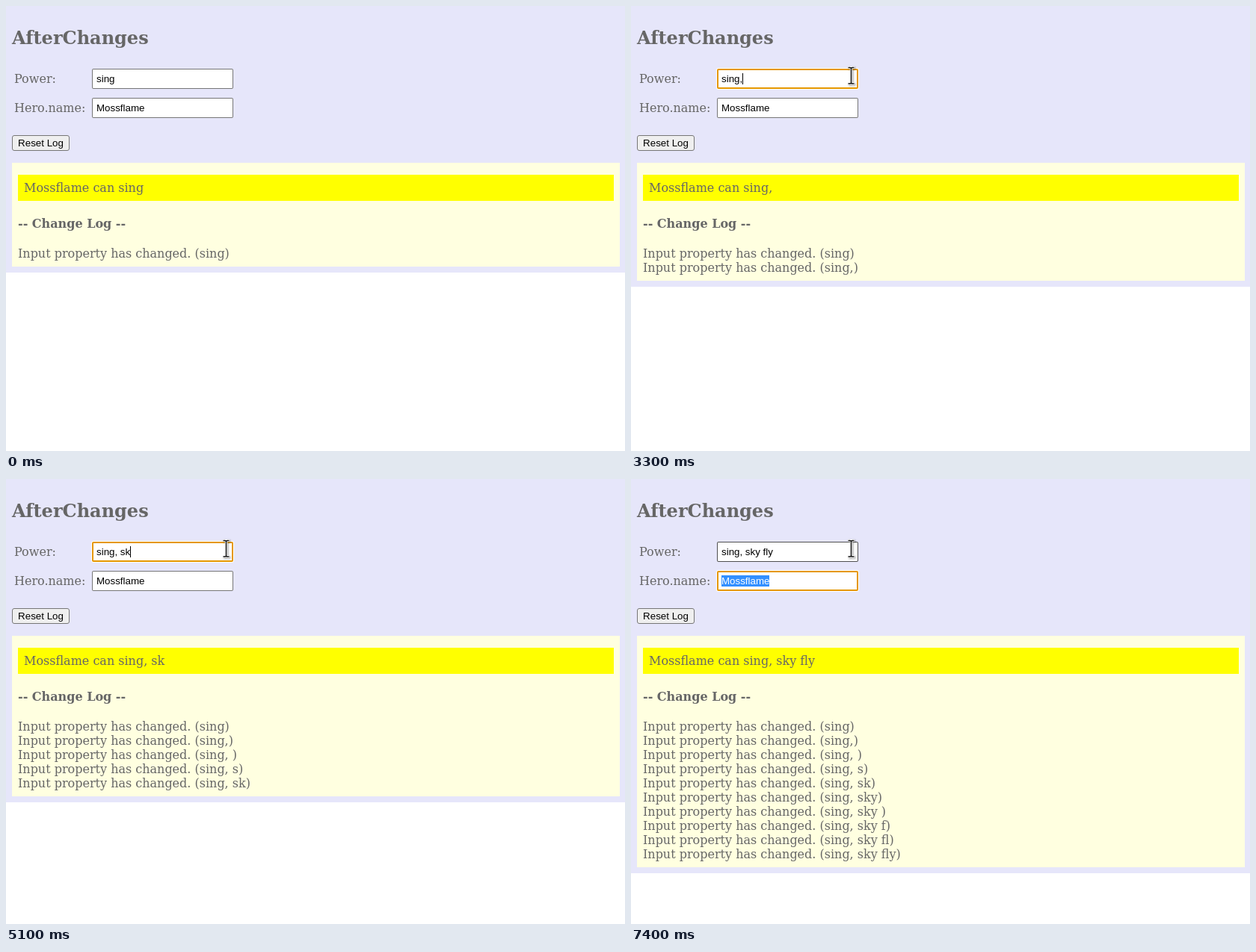
An HTML page that plays this animation: 828x596 px, repeating every 8 s.

```html
<!DOCTYPE html>
<html lang="en">
<head>
<meta charset="utf-8">
<title>AfterChanges</title>
<style>
  html, body { margin: 0; width: 100%; height: 100%; overflow: hidden; background: #fff; }
  #stage {
    position: relative; width: 828px; height: 596px; overflow: hidden;
    color: #666; font: 16px/19px "DejaVu Serif", serif; cursor: none;
  }
  #stage > * { position: absolute; margin: 0; box-sizing: border-box; }
  #page { left: 0; top: 0; width: 828px; background: #e6e6fa; }
  h2 { left: 8px; top: 28px; font-size: 24px; line-height: 29px; }
  .label { left: 11px; }
  .field, button { font: 13.3333px/15px "Liberation Sans", Arial, sans-serif; color: #000; }
  .field {
    left: 115px; width: 189px; height: 27px; padding: 6px;
    background: #fff; border-radius: 2px; white-space: pre;
    box-shadow: inset 0 0 0 1px #767676;
  }
  .field.hover { box-shadow: inset 0 0 0 1px #4f4f4f; }
  .field.focus { box-shadow: inset 0 0 0 2px #e59700, 0 0 0 1px #fff; }
  .field span { display: inline-block; height: 15px; vertical-align: top; }
  #name.focus span { background: #3390ff; color: #fff; }
  #caret { position: absolute; top: 6px; width: 1px; height: 15px; background: #000; }
  button {
    left: 8px; top: 173px; width: 77px; height: 21px; padding: 0;
    background: #efefef; border: 1px solid #767676; border-radius: 3px; cursor: none;
  }
  #panel { left: 8px; top: 210px; width: 813px; background: #ffffe0; }
  #hero { left: 16px; top: 226px; width: 797px; height: 35px; padding: 8px; background: #ff0; }
  h4 { left: 16px; top: 282px; font-size: 16px; }
  #log { left: 16px; top: 322px; white-space: pre; }
  #cursor { left: 0; top: 0; width: 40px; height: 40px; overflow: visible; filter: drop-shadow(1px 1px 1px #0006); }
</style>
</head>
<body>
<div id="stage">
  <div id="page"></div>
  <h2>AfterChanges</h2>
  <div class="label" style="top:88px">Power:</div>
  <div class="field" id="power" style="top:84px"><span id="text"></span><i id="caret"></i></div>
  <div class="label" style="top:127px">Hero.name:</div>
  <div class="field" id="name" style="top:123px"><span>Mossflame</span></div>
  <button tabindex="-1">Reset Log</button>
  <div id="panel"></div>
  <p id="hero"></p>
  <h4>-- Change Log --</h4>
  <div id="log"></div>
  <svg id="cursor">
    <path id="arrow" d="M0 0V21.5L4.8 17L8.2 24L11.8 22.4L8.5 15.4H14.6Z"
      fill="#111" stroke="#fff" stroke-width="1.2" stroke-linejoin="round"/>
    <g id="beam" fill="none">
      <path d="M-4 -10.5H-1Q.5 -10.5 .5 -9V9.500Q.5 11 -1 11H-4M5 -10.5H2Q.5 -10.5 .5 -9V9.500Q.5 11 2 11H5" stroke="#fff" stroke-width="3.4"/>
      <path d="M-3.500 -10.5H-1Q.5 -10.5 .5 -9V9.500Q.5 11 -1 11H-3.500M4.500 -10.5H2Q.5 -10.5 .5 -9V9.500Q.5 11 2 11H4.500" stroke="#111" stroke-width="1.500"/>
    </g>
  </svg>
</div>
<script>
const LOOP = 8000, APPEAR = 700, FOCUS = 1950, TAB = 7400, BLINK = 500;
const FULL = 'sing, sky fly', START = 4;
const KEYS = [3300, 3800, 4600, 5100, 5300, 5450, 5750, 5850, 6000];
// Cursor path: [time, x, y]
const PATH = [[700, 788, 566], [1200, 313, 94], [1550, 294, 93]];
const $ = id => document.getElementById(id);
const show = (el, on) => { el.style.visibility = on ? 'visible' : 'hidden'; };

let shownLength = -1;

function setText(length) {
  if (length === shownLength) return;
  shownLength = length;
  const value = FULL.slice(0, length);
  $('text').textContent = value;
  $('hero').textContent = 'Mossflame can ' + value;
  const lines = [];
  for (let n = START; n <= length; n++)
    lines.push(`Input property has changed. (${FULL.slice(0, n)})`);
  $('log').textContent = lines.join('\n');
  const bottom = 330 + 19 * lines.length;
  $('panel').style.height = bottom - 210 + 'px';
  $('page').style.height = bottom + 8 + 'px';
  $('caret').style.left = Math.round(6 + $('text').getBoundingClientRect().width) + 'px';
}

function cursorAt(t) {
  const time = Math.min(Math.floor(t / 50) * 50, PATH[2][0]);
  const i = time < PATH[1][0] ? 0 : 1;
  const [a, b] = [PATH[i], PATH[i + 1]];
  const p = 1 - (1 - (time - a[0]) / (b[0] - a[0])) ** 2;
  return [1, 2].map(k => Math.round(a[k] + (b[k] - a[k]) * p));
}

function draw(t) {
  const typed = KEYS.filter(k => k <= t).length;
  setText(START + typed);

  const editing = t >= FOCUS && t < TAB;
  const lastKey = typed ? KEYS[typed - 1] : FOCUS;
  show($('caret'), editing && Math.floor((t - lastKey) / BLINK) % 2 === 0);

  const visible = t >= APPEAR;
  const [x, y] = visible ? cursorAt(t) : [0, 0];
  const inside = visible && x < 304 && y < 111;
  $('cursor').style.transform = `translate(${x}px, ${y}px)`;
  show($('arrow'), visible && !inside);
  show($('beam'), inside);

  $('power').classList.toggle('hover', inside);
  $('power').classList.toggle('focus', editing);
  $('name').classList.toggle('focus', t >= TAB);
}

const begin = performance.now();
function tick() {
  draw((performance.now() - begin) % LOOP);
  requestAnimationFrame(tick);
}
tick();
</script>
</body>
</html>
```
